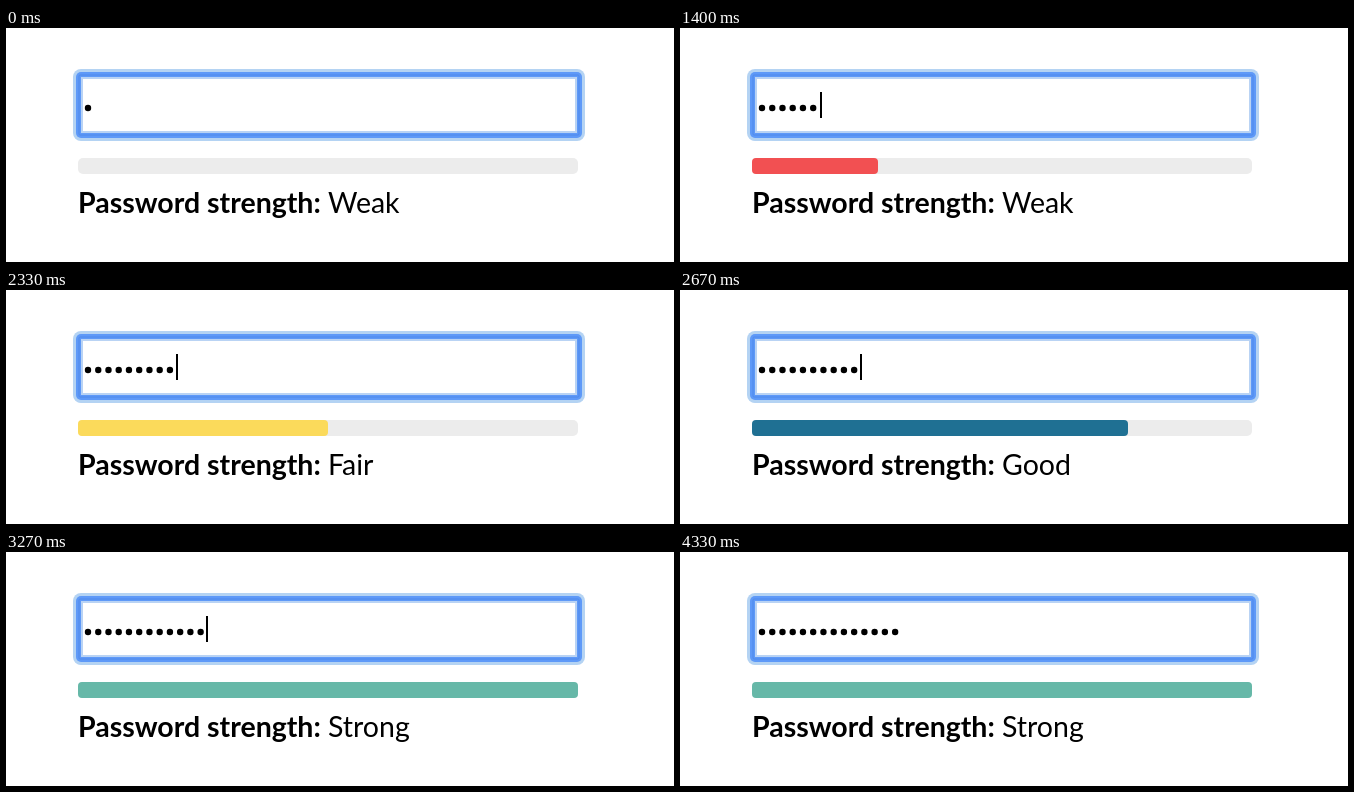
Write an HTML page that moves like this. It is 668 px wide and 234 px high and loops after 4.79 s.

```html
<!DOCTYPE html>
<html lang="en">
<head>
<meta charset="utf-8">
<title>Password strength</title>
<style>
  html, body { margin: 0; width: 100%; height: 100%; overflow: hidden; background: #fff; }
  svg { display: block; }
  text { font: 28.5px Lato, "Open Sans", sans-serif; fill: #000; }
  .label { font-weight: 700; }
</style>
</head>
<body>
<svg width="668" height="234" viewBox="0 0 668 234">
  <rect x="67" y="41" width="512" height="72" rx="8" fill="#b4d3f3"/>
  <rect x="70" y="44" width="506" height="66" rx="5" fill="#5e99f8"/>
  <rect x="73" y="47" width="500" height="60" rx="1" fill="none" stroke="#4f89ea"/>
  <rect x="75" y="49" width="496" height="56" fill="#b9d3f4"/>
  <rect x="77" y="51" width="492" height="52" fill="#fff"/>
  <g id="dots"></g>
  <rect id="caret" y="64" width="2" height="26"/>
  <rect x="72" y="130" width="500" height="16" rx="5" fill="#ececec"/>
  <rect id="fill" x="72" y="130" height="16" rx="4"/>
  <text class="label" x="72" y="185">Password strength:</text>
  <text id="status" x="322" y="185"></text>
</svg>
<script>
const LOOP = 4790;
const BLINK = 460;
const PITCH = 10.24;

// Moments of the key presses in ms; the first falls before the loop begins.
const KEYS = [-520, 600, 800, 1000, 1070, 1400, 1960, 2140, 2330, 2670, 2870, 3270, 3600, 3870];

// Each level is reached at a number of typed characters.
const LEVELS = [
  { from: 0, text: 'Weak', color: 'none' },
  { from: 5, text: 'Weak', color: '#f25052' },
  { from: 8, text: 'Fair', color: '#fbda5b' },
  { from: 10, text: 'Good', color: '#1f7093' },
  { from: 12, text: 'Strong', color: '#66b8a8' }
];

const $ = id => document.getElementById(id);
const set = (el, attrs) => {
  for (const key in attrs) el.setAttribute(key, attrs[key]);
};
const show = (el, on) => set(el, { visibility: on ? 'visible' : 'hidden' });

// Whole CSS pixels on a 2x display.
const snap = x => 2 * Math.round(x / 2);

const dots = KEYS.map((_, i) => {
  const dot = document.createElementNS('http://www.w3.org/2000/svg', 'circle');
  set(dot, { cx: 82 + i * PITCH, cy: 80, r: 3.2 });
  return $('dots').appendChild(dot);
});

function draw(t) {
  const count = KEYS.filter(key => key <= t).length;
  const idle = t - KEYS[count - 1];
  const level = LEVELS.findLastIndex(({ from }) => from <= count);
  const { text, color } = LEVELS[level];

  dots.forEach((dot, i) => show(dot, i < count));
  set($('caret'), { x: snap(78 + count * PITCH) });
  show($('caret'), Math.floor(idle / BLINK) % 2 === 0);
  set($('fill'), { width: snap(level * 125), fill: color });
  $('status').textContent = text;
}

const start = performance.now();
function tick() {
  draw((performance.now() - start) % LOOP);
  requestAnimationFrame(tick);
}
tick();
</script>
</body>
</html>
```
